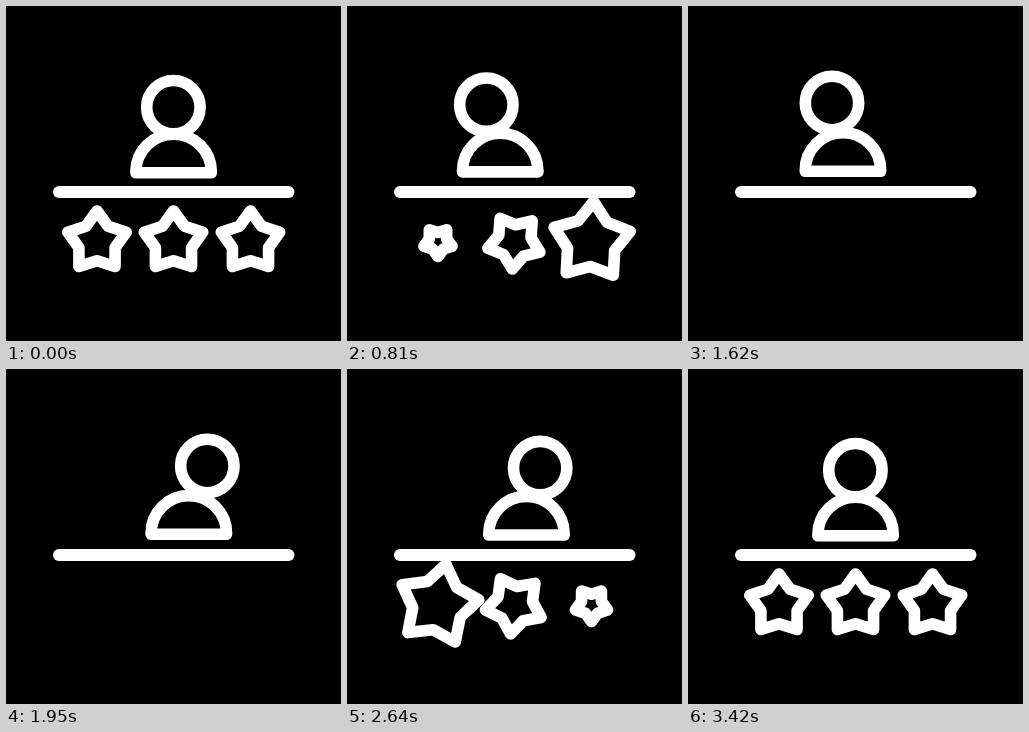
Recreate the animation shown at these times as an HTML page. Size 335 by 335 pixels, loop 3600 ms.

```html
<!DOCTYPE html>
<html lang="en">
<head>
<meta charset="utf-8">
<title>Rating</title>
<style>
  html, body { margin: 0; width: 100%; height: 100%; overflow: hidden; background: #000; }
  svg { display: block; width: 100vw; height: 100vh; }
</style>
</head>
<body>
<svg viewBox="0 0 335 335" fill="none" stroke="#fff" stroke-width="11.6" stroke-linecap="round" stroke-linejoin="round">
  <circle id="head" r="26.7"/>
  <path id="body" d="M-37.7 0V-1A37.7 37.7 0 0 1 37.7 -1V0Z"/>
  <path d="M53 186H282.5" stroke-width="12"/>
  <path class="star"/>
  <path class="star"/>
  <path class="star"/>
</svg>
<script>
const LOOP = 3600, STEP = 30;
const STAR_X = [91, 167.5, 244.5], STAR_Y = 235.7, RADIUS = 30.7, INNER = 0.62;
const STAGGER = 180, PEAK = 430, TURNED = 720, GONE = 1020;

const head = document.getElementById('head');
const body = document.getElementById('body');
const stars = [...document.querySelectorAll('.star')];

// Progress from 0 to 1 between two times
const progress = (t, from, to) => Math.min(1, Math.max(0, (t - from) / (to - from)));

function ease(t, from, to) {
  const u = progress(t, from, to);
  return u * u * (3 - 2 * u);
}

function starPath(cx, cy, radius, degrees) {
  let d = '';
  for (let k = 0; k < 10; k++) {
    const a = (degrees + k * 36) * Math.PI / 180;
    const r = k % 2 ? radius * INNER : radius;
    d += `${k ? 'L' : 'M'}${(cx + r * Math.sin(a)).toFixed(2)} ${(cy - r * Math.cos(a)).toFixed(2)}`;
  }
  return d + 'Z';
}

function drawStar(star, i, t) {
  // The entrance is the exit played backwards
  const local = t < 1700 ? t - STAGGER * i : 3060 + STAGGER * i - t;
  const swell = progress(local, 0, PEAK) ** 1.5;
  const turn = 1 - (1 - progress(local, PEAK, TURNED)) ** 2;
  const scale = (1 + 0.35 * swell) * (1 - progress(local, PEAK, GONE));
  const angle = -63 * swell - 45 * turn;
  star.setAttribute('d', scale < 0.03 ? '' : starPath(STAR_X[i], STAR_Y, RADIUS * scale, angle));
}

function drawPerson(t) {
  const left = ease(t, 445, 1097);
  const across = ease(t, 1360, 2170);
  const back = ease(t, 2312, 2964);
  const lift = left - back;
  const lean = (l, r) => (-l * left + (l + r) * across) - r * back;
  head.setAttribute('transform', `translate(${167.4 + lean(47.6, 52)} ${101.2 - 4.2 * lift})`);
  body.setAttribute('transform', `translate(${167.6 + lean(24.4, 24)} ${166.8 - 1.5 * lift})`);
}

function frame(now) {
  const t = Math.floor(now % LOOP / STEP) * STEP;
  drawPerson(t);
  stars.forEach((star, i) => drawStar(star, i, t));
}

const start = performance.now();
function tick() {
  frame(performance.now() - start);
  requestAnimationFrame(tick);
}
tick();
</script>
</body>
</html>
```
